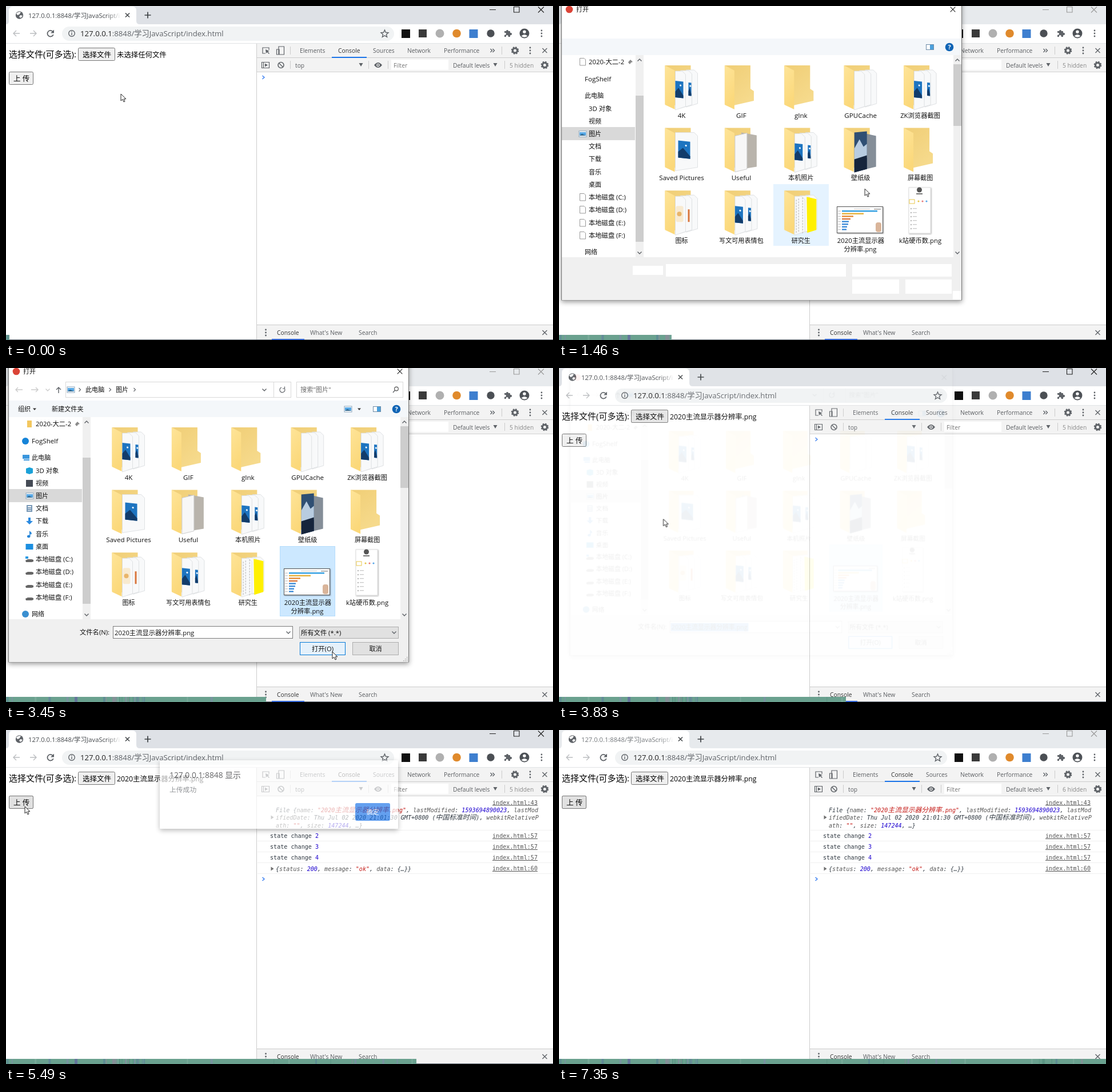
Write an HTML page that moves like this. It is 957 by 585 pixels and loops after 7.4 s.

```html
<!DOCTYPE html>
<html lang="zh-CN">
<head>
<meta charset="utf-8">
<title>上传文件</title>
<style>
html, body { margin: 0; width: 100%; height: 100%; overflow: hidden; background: #fff; }
svg { position: absolute; left: 0; top: 0; display: block; }
text { font-family: "Open Sans", "Noto Sans CJK SC", "Noto Sans CJK", sans-serif; white-space: pre; }
.dev { font-size: 10.3px; fill: #5a5d61; }
.mono text { font-family: "DejaVu Sans Mono", "Noto Sans CJK SC", monospace; font-size: 10.1px; fill: #303942; }
.mono .obj { font-style: italic; }
.mono .key { fill: #555; }
.mono .num { fill: #1c00cf; }
.mono .str { fill: #c41a16; }
.mono .cjk { font-size: 11.8px; }
.mono .link { fill: #555; text-decoration: underline; }
.line { fill: none; stroke: #5f6368; stroke-width: 1.4; }
#dialog { transform-origin: 340px 245px; }
#bar { position: absolute; left: 0; top: 576px; height: 9px; overflow: hidden; }
</style>
</head>
<body>
<svg id="stage" width="957" height="585" viewBox="0 0 957 585"></svg>
<div id="bar"><svg id="stripes" width="957" height="9"></svg></div>
<svg width="957" height="585" viewBox="0 0 957 585">
  <path id="cursor" d="M0 0V12L3 9.4L5 14L7 13L5.1 8.8H9Z" fill="#fff" stroke="#222"/>
</svg>
<script>
const LOOP = 7400;
const rect = (x, y, w, h, fill, more = '') =>
  `<rect x="${x}" y="${y}" width="${w}" height="${h}" fill="${fill}" ${more}/>`;
const path = (d, fill, more = '') => `<path d="${d}" fill="${fill}" ${more}/>`;
const line = (d, more = '') => `<path class="line" d="${d}" ${more}/>`;
const dot = (x, y, r, fill, more = '') => `<circle cx="${x}" cy="${y}" r="${r}" fill="${fill}" ${more}/>`;
const text = (x, y, s, size, fill = '#222', more = '') =>
  `<text x="${x}" y="${y}" font-size="${size}" fill="${fill}" ${more}>${s}</text>`;
const dev = (x, y, s, more = '') => `<text class="dev" x="${x}" y="${y}" ${more}>${s}</text>`;
const at = (x, y, s) => `<g transform="translate(${x} ${y})">${s}</g>`;
const group = (id, s) => `<g id="${id}">${s}</g>`;
const dots = (x, y) => [-5, 0, 5].map(d => dot(x, y + d, 1.4, '#5f6368')).join('');
const cross = (x, y, r, more) => line(`M${x - r} ${y - r}l${2 * r} ${2 * r}m0 ${-2 * r}l${-2 * r} ${2 * r}`, more);
const gear = (x, y) => dot(x, y, 4, 'none', 'stroke="#5f6368" stroke-width="3"')
  + dot(x, y, 5.8, 'none', 'stroke="#5f6368" stroke-width="2" stroke-dasharray="2.6 1.95"');

// Browser window
function titleBar(strip, ink, label) {
  const pen = `style="stroke:${ink};stroke-width:1.1"`;
  return rect(0, 0, 957, 32, strip)
    + path('M0 32Q5 32 5 26V8Q5 1 12 1H221Q228 1 228 8V26Q228 32 234 32Z', '#fff')
    + dot(23.5, 16, 6.7, '#5f6368')
    + path('M18 13Q22 9 26 11L23 15L20 16ZM25 16L29 17L26 21L23 19Z', '#fff')
    + text(39, 20.5, '127.0.0.1:8848/学习JavaScript/i', 11.2, label)
    + rect(176, 8, 30, 18, 'url(#fade)')
    + cross(212.5, 16, 3.6, 'style="stroke:#3c4043"')
    + line('M242.500 16H253.500M248 10.500V21.500', 'style="stroke:#3c4043;stroke-width:1.700"')
    + line('M846 6.500H857M888.500 1.500H898V11H888.500Z', pen) + cross(936, 6.5, 5, pen);
}

const toolbar = rect(0, 32, 957, 34, '#fff') + rect(0, 65, 957, 1, '#e1e3e5')
  + rect(98, 36, 581, 25, '#f1f3f4', 'rx="12.5"')
  + line('M24 48H13M18 43L13 48L18 53M42 48H53M48 43L53 48L48 53', 'style="stroke:#bbbdc0"')
  + line('M82 45A5.300 5.300 0 1 0 82.800 50', 'style="stroke-width:1.800"') + path('M84 41.500V47.500H78Z', '#5f6368')
  + dot(115, 48, 5.3, 'none', 'stroke="#5f6368" stroke-width="1.4"') + rect(114.3, 47, 1.4, 4, '#5f6368') + rect(114.3, 44.5, 1.4, 1.5, '#5f6368')
  + text(130, 53, '127.0.0.1<tspan fill="#5f6368">:8848/学习JavaScript/index.html</tspan>', 13.2)
  + line('M662.500 42L664.300 46.300L669 46.700L665.400 49.800L666.600 54.300L662.500 51.900L658.400 54.300L659.600 49.800L656 46.700L660.700 46.300Z')
  + rect(692, 41, 15, 15, '#111') + rect(722, 41, 14, 14, '#3a3a3a') + dot(759, 48, 7.5, '#b0b0b0')
  + dot(788.5, 48, 7.3, '#e08a2c') + rect(810.5, 41, 15, 15, '#3e7fcf') + dot(848, 48, 6.7, '#4b4f54')
  + path('M872 44H875A2 2 0 1 1 879 44H882V47A2.200 2.200 0 1 1 882 51V54H878.500A2 2 0 1 0 875 54H872V50.500A2 2 0 1 0 872 47Z', '#5f6368')
  + dot(907, 48, 8.5, '#4d5156') + dot(907, 45.3, 2.7, '#fff') + path('M901.500 52.500Q907 47.500 912.500 52.500Q907 57 901.500 52.500Z', '#fff')
  + dots(937, 48);

const button = (x, y, w, h, fill) => rect(x + .5, y + .5, w, h, fill, 'stroke="#767676" rx="2"');
const page = rect(0, 66, 439, 519, '#fff')
  + text(5, 90, '选择文件(可多选):', 15, '#000')
  + button(126, 73, 64, 22, '#efefef') + group('pickHover', button(126, 73, 64, 22, '#e5e5e5'))
  + text(134, 89.5, '选择文件', 12.5, '#000')
  + group('noFile', text(194, 89.5, '未选择任何文件', 12.4, '#000'))
  + group('hasFile', text(194, 89.5, '2020主流显示器分辨率.png', 12.3, '#000'))
  + button(5, 115, 42, 22, '#efefef') + group('sendHover', button(5, 115, 42, 22, '#e1e1e1'))
  + text(13, 131.5, '上 传', 12.5, '#000');

// Developer tools
const tabs = [[514, 'Elements'], [581, 'Console'], [642, 'Sources'], [702, 'Network'], [766, 'Performance']];
const bars = [497, 867].map(x => rect(x, 71, 1, 14, '#ccc')).join('')
  + [497, 634, 668, 872].map(x => rect(x, 96, 1, 14, '#ccc')).join('');
const tools = rect(439, 66, 518, 519, '#fff') + rect(439, 66, 518, 50, '#f3f3f3')
  + rect(439, 90, 518, 1, '#ccc') + rect(439, 115, 518, 1, '#d0d0d0') + rect(438, 66, 1, 519, '#ccc') + bars
  + tabs.map(([x, s]) => dev(x, 82, s, s === 'Console' ? 'style="fill:#333"' : '')).join('') + rect(570, 89, 61, 2, '#1a73e8')
  + line('M460 77V73H449V83H454', 'style="stroke-width:1.200"') + path('M454 76L461 79L458 80L461 83L460 84L457 81L455 83Z', '#5f6368')
  + line('M477 71H486.500V85H477ZM473.500 76H478V85H473.500Z', 'style="stroke-width:1.200"')
  + line('M847.500 75L850.500 78L847.500 81M851.500 75L854.500 78L851.500 81') + gear(890.5, 78) + dots(917, 78) + cross(942.5, 78, 4)
  + line('M447.500 98.500H460.500V108.500H447.500ZM450.500 98.500V108.500', 'style="stroke-width:1.200"') + path('M453 100.500L458 103.500L453 106.500Z', '#5f6368')
  + dot(481, 103.5, 5, 'none', 'stroke="#5f6368" stroke-width="1.6"') + line('M477.500 100L484.500 107')
  + dev(506, 107.5, 'top') + path('M617.500 100H624.500L621 106Z', '#5f6368')
  + path('M644 103.500Q651 94.500 658 103.500Q651 112.500 644 103.500Z', '#5f6368') + dot(651, 103.5, 2.7, '#f3f3f3') + dot(651, 103.5, 1.4, '#5f6368')
  + rect(674, 94, 100, 18, '#fff') + dev(678, 107.5, 'Filter', 'style="fill:#777"')
  + dev(782, 107.5, 'Default levels') + path('M852.500 100H859.500L856 106Z', '#5f6368')
  + group('five', dev(881, 107.5, '5 hidden', 'style="fill:#8a8a8a"')) + group('six', dev(881, 107.5, '6 hidden', 'style="fill:#8a8a8a"'))
  + gear(942.5, 103.5)
  + rect(439, 558, 518, 1, '#ccc') + rect(439, 559, 518, 26, '#f3f3f3') + dots(454.5, 572)
  + dev(474, 576, 'Console', 'style="fill:#333"') + dev(532, 576, "What's New") + dev(617, 576, 'Search') + cross(942.5, 572, 4)
  + rect(0, 584, 957, 1, '#68717b') + rect(465, 583, 57, 2, '#3367d6');

const run = (cls, s) => `<tspan class="${cls}">${s}</tspan>`;
const row = (x, y, s, cls = '') => `<text class="${cls}" x="${x}" y="${y}">${s}</text>`;
const link = (y, n) => row(851, y, 'index.html:' + n, 'link');
const prompt = y => line(`M448.500 ${y - 3}L452 ${y}L448.500 ${y + 3}`, 'style="stroke:#367cf1"');
const caret = y => path(`M463.500 ${y - 3.5}L468.500 ${y}L463.500 ${y + 3.5}Z`, '#6e6e6e');
const rule = y => rect(440, y, 517, 1, '#f0f0f0');
const file = caret(153) + link(130.5, 43)
  + row(472, 143.5, `File {${run('key', 'name')}: ${run('str', '"2020' + run('cjk', '主流显示器分辨率') + '.png"')}, ${run('key', 'lastModified')}: ${run('num', '1593694890023')}, ${run('key', 'lastMod')}`, 'obj')
  + row(472, 157, `${run('key', 'ifiedDate')}: Thu Jul 02 2020 21:01:30 GMT+0800 (${run('cjk', '中国标准时间')}), ${run('key', 'webkitRelativeP')}`, 'obj')
  + row(472, 170.5, `${run('key', 'ath')}: ${run('str', '""')}, ${run('key', 'size')}: ${run('num', '147244')}, …}`, 'obj') + rule(175);
const states = [2, 3, 4].map((n, i) => row(462, 189 + 19 * i, `state change ${run('num', n)}`) + link(189 + 19 * i, 57) + rule(194 + 19 * i)).join('');
const reply = caret(243) + row(472, 246.5, `{${run('key', 'status')}: ${run('num', 200)}, ${run('key', 'message')}: ${run('str', '"ok"')}, ${run('key', 'data')}: {…}}`, 'obj')
  + link(246, 60) + rule(251);
const log = group('idle', prompt(125)) + group('log', `<g class="mono">${file + states + reply}</g>` + prompt(261));

// File dialog
const fit = s => /^[ -~]+$/.test(s) ? 11.6 : /[ -~]/.test(s) ? 11.3 : 11.1;
const ui = (x, y, s, more = '') => text(x, y, s, fit(s), '#111', more);
const mid = (x, y, s) => ui(x, y, s, 'text-anchor="middle"');

const photo = (x, y, w, h) => at(x, y, `<g transform="skewY(6)">${rect(0, 0, w, h, '#1d74c0')
  + path(`M0 ${h}V${h * .65}L${w * .4} ${h * .4}L${w} ${h * .85}V${h}Z`, '#123c6b') + dot(w * .65, h * .25, 1.6, '#e8f4ff')}</g>`);
const leaf = (x, w, top, end) => path(`M${x} ${top}H${x + w - 6}L${x + w} ${top + 6}V${end - 6}L${x} ${end}Z`, '#f8f9fa', 'stroke="#d9dbdd" stroke-width=".8"');
const wide = leaf(-11, 39, 8, 75);
const sheets = leaf(8, 20, 8, 73) + leaf(-2, 20, 9, 75) + leaf(-11, 18, 10, 78);
const fillings = {
  empty: '',
  pages: sheets,
  photos: sheets + photo(-11, 27, 14, 29) + photo(12, 30, 5, 23),
  saved: wide + photo(-6, 22, 21, 30),
  notes: path('M0 8L27 13V68L2 72Z', '#b9b4ac') + path('M-11 14L10 9V72L-11 77Z', '#f7f7f7', 'stroke="#ccc"'),
  wall: path('M0 8L27 14V68L2 74Z', '#858e98') + path('M-11 8L11 6V72L-11 78Z', '#2f4f73')
    + path('M-11 36L-2 20L5 33L11 28V52L-11 62Z', '#b8cce0') + path('M-11 55L11 48V72L-11 78Z', '#16253c'),
  cards: sheets + rect(-10, 27, 13, 28, '#f8ead0', 'rx="3"') + dot(-4, 41, 4, '#e9b56a') + rect(11, 33, 3, 22, '#d9763d'),
  yellow: sheets + path('M10 11L27 15V69L11 74Z', '#fff000')
    + line('M-8 16V74M-4 14V74M3 12V75', 'style="stroke:#c9c9c9;stroke-width:1.500;stroke-dasharray:3 2"')
};
const folder = kind => path('M-29 0H16V41L22 45V62L-13 70L-29 68Z', 'url(#gold)')
  + fillings[kind] + path('M-29 0L-12 9V77L-29 69Z', 'url(#flap)');
const items = [
  ['4K', 'photos'], ['GIF', 'empty'], ['gInk', 'empty'], ['GPUCache', 'pages'], ['ZK浏览器截图', 'photos'],
  ['Saved Pictures', 'saved'], ['Useful', 'notes'], ['本机照片', 'photos'], ['壁纸级', 'wall'], ['屏幕截图', 'empty'],
  ['图标', 'cards'], ['写文可用表情包', 'photos'], ['研究生', 'yellow']
];
const grid = items.map(([name, kind], i) => {
  const x = 214.5 + 104.4 * (i % 5), y = 104 + 109.6 * Math.floor(i / 5);
  return at(x, y, folder(kind)) + mid(x, y + 91.5, name);
}).join('');

const barColors = ['#2f9de0', '#e5b13b', '#e58a32', '#d8763d', '#3c8bd8', '#3c8bd8', '#3c8bd8', '#3c8bd8'];
const chart = rect(486.5, 351.5, 80, 46, '#fff', 'stroke="#555" filter="url(#soft)"')
  + rect(551, 355, 12, 1.5, '#999') + rect(516, 355, 28, 1.2, '#ccc')
  + barColors.map((c, i) => rect(495, 358 + 4.6 * i, [62, 38, 20, 15, 12, 11, 9, 8][i], 2.4, c) + rect(488, 358.7 + 4.6 * i, 5, 1, '#bbb')).join('')
  + rect(554, 379, 10, 17, '#d9b59a', 'rx="4"');
const phone = rect(612, 318, 38, 80, '#fff', 'stroke="#ddd" filter="url(#soft)"')
  + dot(630.5, 322, 4.5, '#555') + rect(625, 328, 11, 2, '#777') + rect(613, 339, 9, 7, '#fff', 'stroke="#e8c64a"')
  + ['#e8c64a', '#e87a7a', '#58a6e8'].map((c, i) => dot(629 + 7 * i, 342, 1.6, c)).join('')
  + [0, 1, 2, 3, 4, 5].map(i => dot(616, 355 + 7 * i, 1.3, '#bbb') + rect(619, 354 + 7 * i, 7, 1.4, '#ccc')).join('');
const target = (fill, stroke) => rect(479.5, 312.5, 96, 122, fill, `stroke="${stroke}"`);
const list = group('hoverA', rect(375, 312, 97, 108, '#e5f3ff')) + group('hoverB', target('#e5f3ff', '#e5f3ff'))
  + group('picked', target('#cce8ff', '#b4dcfc')) + grid + chart + phone
  + mid(528, 415, '2020主流显示器') + mid(527, 430, '分辨率.png') + mid(632, 415, 'k站硬币数.png');

const round = 'M-6 0a6 6 0 1 0 12 0a6 6 0 1 0 -12 0';
const drive = 'M-7 2L-3 0H4L7 1V4L4 5H-6Z';
const places = [
  [52, 98, '2020-大二-2', 'M-4 -6H4V6H-4Z', '#f3c75f'], [45, 128, 'FogShelf', round, '#1684d8'],
  [45, 157, '此电脑', 'M-5 -5H7V2H-5ZM-3 3H7V5H-3Z', '#3a96dd'], [52, 180, '3D 对象', 'M0 -6L6 -4V4L0 6L-6 4V-4Z', '#1ba1d8'],
  [52, 202, '视频', 'M-6 -6H6V6H-6Z', '#454b55'], [52, 224, '图片', '', ''],
  [52, 246, '文档', 'M-5 -6H5V6H-5ZM-3 -4V-2H3V-4ZM-3 0V1H3V0ZM-3 3V4H3V3Z', '#7898b6'], [52, 268, '下载', 'M-2 -6H2V0H6L0 6L-6 0H-2Z', '#2b8ae0'],
  [52, 291, '音乐', 'M0 -6L4 -2L3 1L1.500 -1V4A2.800 2.300 0 1 1 0 2Z', '#2484d8'], [52, 313, '桌面', 'M-6.500 -5H6.500V5H-6.500Z', '#1c8fe0'],
  [52, 335, '本地磁盘 (C:)', drive, '#666'], [52, 357, '本地磁盘 (D:)', drive, '#666'],
  [52, 380, '本地磁盘 (E:)', drive, '#666'], [52, 402, '本地磁盘 (F:)', drive, '#666'], [45, 431, '网络', round, '#3a8fd0']
];
const picIcon = (x, y) => rect(x, y, 13, 10, '#fff', 'stroke="#8aa4ba"') + rect(x + 1, y + 2, 11, 6, '#58a9e6') + path(`M${x + 1} ${y + 8}L${x + 5} ${y + 5}L${x + 12} ${y + 8}Z`, '#2c6288');
const treeText = places.map(([x, y, s]) => ui(x, y + 4, s)).join('');
const treeIcons = places.map(([x, y, , d, c]) => at(x - 11, y, path(d, c, 'fill-rule="evenodd"'))).join('') + rect(34, 330, 5, 4, '#2d9be5');
const blankIcons = places.filter(p => p[3] === drive || p[1] === 98)
  .map(([, y]) => path(`M36.500 ${y - 6.5}H44L46.500 ${y - 4}V${y + 6}H36.500Z`, '#fff', 'stroke="#999"')).join('');
const chevron = (x, y, k = 1, ink = '#5f6368') => line(`M${x - 3.5} ${y - 1.5 * k}L${x} ${y + 2 * k}L${x + 3.5} ${y - 1.5 * k}`, `style="stroke:${ink}"`);
const angle = x => line(`M${x - 1.5} 35L${x + 1.5} 38L${x - 1.5} 41`, 'style="stroke-width:1.100"');
const small = (x, y) => path(`M${x - 3} ${y - 1.5}H${x + 3}L${x} ${y + 2}Z`, '#333');

const head = line('M29 38H17M21 34L17 38L21 42M44 38H56M52 34L56 38L52 42', 'style="stroke:#ccc"') + chevron(73, 38, 1, '#ccc')
  + line('M92 44V34M88 38L92 34L96 38')
  + rect(104.5, 24.5, 394, 27, '#fff', 'stroke="#d9d9d9"') + rect(468, 25, 1, 27, '#d9d9d9')
  + picIcon(107, 33) + angle(129) + ui(139, 42, '此电脑') + angle(182) + ui(192, 42, '图片') + angle(225) + chevron(452, 38)
  + line('M487 35.500A4.500 4.500 0 1 1 482 34M487.500 32.500V36H484', 'style="stroke-width:1.200"')
  + rect(508.5, 24.5, 186, 27, '#fff', 'stroke="#d9d9d9"') + text(515, 42, '搜索"图片"', 11.2, '#6d6d6d')
  + dot(683, 36.5, 3.3, 'none', 'stroke="#555" stroke-width="1.2"') + line('M680.500 39L677 43')
  + ui(21, 76, '组织') + small(50, 72) + ui(80, 76, '新建文件夹') + picIcon(592, 67) + small(618, 72);
const field = edge => rect(187.5, 452.5, 314, 21, '#fff', `stroke="${edge}"`);
const foot = rect(128, 451, 576, 63, '#f0f0f0') + ui(129, 467, '文件名(N):')
  + field('#7a7a7a') + group('focus', field('#0078d7'))
  + group('marked', rect(189, 456, 142, 15, '#4a9be8')) + group('fileName', ui(190, 467.5, '2020主流显示器分辨率.png')) + chevron(494, 463)
  + rect(513.5, 453.5, 173, 20, '#e1e1e1', 'stroke="#adadad"') + ui(516, 467.5, '所有文件 (*.*)') + chevron(679, 463)
  + rect(515, 481, 78, 21, '#e1e1e1', 'stroke="#0078d7" stroke-width="2"')
  + group('openHover', rect(514.5, 480.5, 79, 22, '#e5f1fb', 'stroke="#0078d7"')) + mid(554, 495.5, '打开(O)')
  + rect(606.5, 480.5, 80, 22, '#e1e1e1', 'stroke="#adadad"') + mid(646.5, 495.5, '取消')
  + [[702, 507], [699, 510], [702, 510], [696, 513], [699, 513], [702, 513]].map(p => rect(p[0] - 1, p[1] - 1, 1.5, 1.5, '#aaa')).join('');

const boxes = [[129, 455, 53, 16], [187, 452, 315, 22], [513, 452, 174, 22], [513, 479, 82, 25], [606, 479, 81, 25], [689, 499, 15, 15]];
const dialog = rect(4.5, -12, 700, 527, '#fff', 'stroke="#777" filter="url(#shadow)"')
  + dot(18, 6, 6.3, '#db4437') + ui(30, 10, '打开') + cross(689, 6, 4.3, 'style="stroke:#222;stroke-width:1.100"')
  + rect(5, 57, 699, 29, '#f4f7fa') + rect(642.5, 67.5, 13, 9, '#fff', 'stroke="#6c8ca8"') + rect(649, 68, 6, 8, '#4ba0dc')
  + dot(683, 72, 7.3, '#0f64b5') + text(683, 76, '?', 11, '#fff', 'text-anchor="middle" font-weight="bold"')
  + rect(5, 212, 128, 23, '#d9d9d9') + rect(134, 86, 14, 354, '#f0f0f0') + rect(134, 157, 14, 256, '#cdcdcd')
  + rect(690, 86, 14, 354, '#f0f0f0') + rect(690, 102, 14, 108, '#cdcdcd')
  + chevron(141, 95, -1) + chevron(141, 432) + chevron(697, 95, -1) + chevron(697, 432)
  + treeText + picIcon(35, 219) + path('M122 97L125 94L129 98L126 99L124 102L121 99Z', '#8a8a8a')
  + group('blank', blankIcons) + list + rect(5, 440, 699, 75, '#f0f0f0')
  + boxes.map(b => rect(...b, '#fff')).join('') + group('late', head + treeIcons + foot);

const alertBox = rect(269, 53, 417, 120, '#fff', 'rx="2" filter="url(#shadow)"')
  + text(286, 84, '127.0.0.1:8848 显示', 13.8, '#202124') + text(286, 108.5, '上传成功', 11.8, '#5f6368')
  + rect(611, 128, 61, 31, '#1a73e8', 'rx="3"') + text(641.5, 148, '确定', 11, '#fff', 'text-anchor="middle" font-weight="500"');

const defs = `<defs>
  <linearGradient id="fade"><stop stop-color="#fff" stop-opacity="0"/><stop offset=".85" stop-color="#fff"/></linearGradient>
  <linearGradient id="gold" x2=".6" y2="1"><stop stop-color="#f0ce76"/><stop offset="1" stop-color="#f6da8c"/></linearGradient>
  <linearGradient id="flap" x2=".3" y2="1"><stop stop-color="#fee498"/><stop offset="1" stop-color="#fbd87a"/></linearGradient>
  <filter id="shadow" x="-5%" y="-10%" width="110%" height="125%"><feDropShadow dx="0" dy="3" stdDeviation="4.5" flood-opacity=".4"/></filter>
  <filter id="soft"><feDropShadow dx="1" dy="1" stdDeviation="1" flood-opacity=".35"/></filter></defs>`;
document.getElementById('stage').innerHTML = defs + titleBar('#dee1e6', '#222', '#45494d')
  + group('inactive', titleBar('#e7eaed', '#999', '#74787c')) + page + tools + log + toolbar
  + group('alert', alertBox) + group('dialog', dialog);

// Progress strip
let seed = 7;
const rnd = () => (seed = seed * 16807 % 2147483647) / 2147483647;
const tints = ['#7f8fa8', '#5c8797', '#8f8c9c', '#7fae9f', '#5a9484'];
let strip = rect(0, 0, 957, 9, '#6aa18f') + rect(120, 0, 5, 9, '#64769b');
for (let i = 0; i < 50; i++) {
  const x = i < 22 ? 170 + rnd() * 75 : rnd() * 957;
  strip += rect(x.toFixed(1), 0, (1 + rnd() * 3).toFixed(1), 9, tints[Math.floor(rnd() * 5)], 'opacity=".7"');
}
document.getElementById('stripes').innerHTML = strip;

// Motion: keys are milliseconds within the loop
let css = '';
function animate(id, keys, ease = 'linear') {
  const steps = Object.entries(keys).map(([ms, rule]) => `${(ms / LOOP * 100).toFixed(3)}%{${rule}}`).join('');
  css += `@keyframes ${id}{${steps}}#${id}{animation:${id} ${LOOP}ms ${ease} infinite}`;
}
function show(id, ...spans) {
  const keys = { 0: 'opacity:0', [LOOP]: 'opacity:0' };
  for (const [from, to] of spans) {
    keys[to] = 'opacity:0';
    keys[from] = 'opacity:1';
  }
  animate(id, keys, 'step-end');
}
show('inactive', [1100, 3640], [7050, LOOP - 1]);
show('pickHover', [600, 3850]);
show('sendHover', [4100, LOOP - 1]);
show('noFile', [0, 3640]);
show('hasFile', [3640, LOOP - 1]);
show('five', [0, 6300]);
show('six', [6300, LOOP - 1]);
show('idle', [0, 5000]);
show('log', [5000, LOOP - 1]);
show('blank', [1100, 1510]);
show('late', [1510, 3900]);
show('hoverA', [1400, 1560]);
show('hoverB', [1560, 2280]);
show('picked', [2280, 3900]);
show('focus', [1510, 2280]);
show('fileName', [2350, 3900]);
show('marked', [3520, 3900]);
show('openHover', [3050, 3900]);

const pose = (o, k) => `opacity:${o};transform:scale(${k})`;
animate('dialog', { 0: pose(0, .93), 1120: pose(0, .93), 1300: pose(1, 1), 3640: pose(1, 1), 3845: pose(0, .953), [LOOP]: pose(0, .93) });
animate('alert', { 0: 'opacity:0', 5420: 'opacity:0', 5525: 'opacity:1', 6300: 'opacity:1', 6420: 'opacity:0', [LOOP]: 'opacity:0' });
animate('bar', {
  0: 'width:6px;animation-timing-function:step-end', 30: 'width:6px;animation-timing-function:steps(159,start)',
  7350: 'width:957px', [LOOP]: 'width:957px'
});
const stops = [
  [0, 201, 154], [30, 201, 154], [350, 178, 112], [700, 150, 82], [980, 150, 82], [1300, 410, 350], [1460, 535, 320],
  [1600, 537, 347], [1900, 543, 391], [2320, 543, 391], [2620, 668, 436], [3080, 571, 497], [3540, 571, 497],
  [3830, 183, 265], [4160, 33, 134], [5540, 33, 134], [5950, 636, 140], [6420, 636, 140], [6900, 640, 590], [LOOP, 640, 590]
];
animate('cursor', Object.fromEntries(stops.map(([ms, x, y]) => [ms, `transform:translate(${x}px,${y}px)`])));
document.head.append(Object.assign(document.createElement('style'), { textContent: css }));
</script>
</body>
</html>
```
